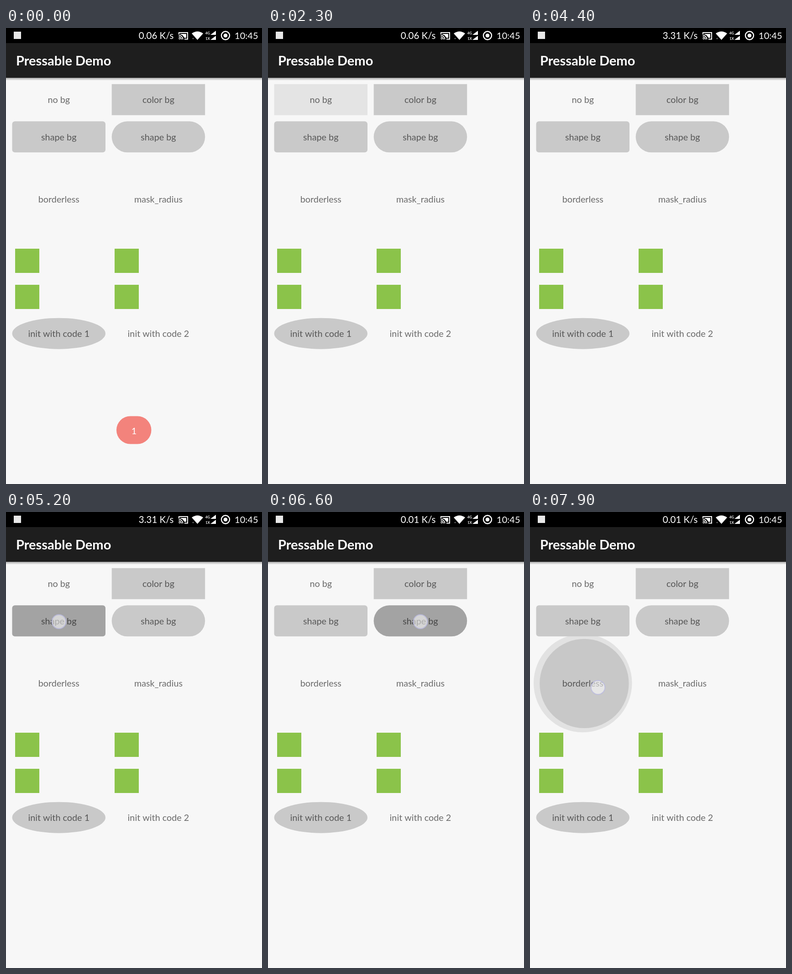
Animation, 561 px wide and 998 px high, one loop 8 s. Source, as an HTML page with a canvas:

```html
<!DOCTYPE html>
<html lang="en">
<head>
<meta charset="utf-8">
<title>Pressable Demo</title>
<style>
html, body { margin: 0; width: 100%; height: 100%; overflow: hidden; background: #f7f7f7; }
canvas { display: block; }
</style>
</head>
<body>
<canvas id="stage" width="561" height="998"></canvas>
<script>
const ctx = document.getElementById('stage').getContext('2d');
const LOOP = 8000, STEP = 100;
const W = 204.5, H = 68, RADIUS = 107.8;
const GREY = '#c9c9c9', INK = 'rgba(0,0,0,.57)';
const clamp = v => Math.max(0, Math.min(1, v));

// Touches: down and up in ms, x and y of the finger
const buttons = [
  { label: 'borderless', x: 13.5, y: 340.5, borderless: true, touch: [7500, 8600, 149, 384] },
  { label: 'mask_radius', x: 231.7, y: 340.5 },
  { label: 'no bg', x: 13.5, y: 122.7, corner: 0, touch: [1230, 2050, 116, 155.5] },
  { label: 'color bg', x: 231.7, y: 122.7, corner: 0, fill: true, touch: [2550, 3200, 334, 158] },
  { label: 'shape bg', x: 13.5, y: 204.3, corner: 6, fill: true, touch: [4450, 5350, 116, 240] },
  { label: 'shape bg', x: 231.7, y: 204.3, corner: 34, fill: true, touch: [6050, 6620, 334, 240] },
  { label: 'init with code 1', x: 13.5, y: 634.7, ellipse: true, fill: true },
  { label: 'init with code 2', x: 231.7, y: 634.7 }
];

function text(str, x, y, size, color, align = 'center', weight = 400) {
  ctx.font = `${weight} ${size}px Lato, sans-serif`;
  ctx.textAlign = align;
  ctx.fillStyle = color;
  ctx.fillText(str, x, y);
}

function rect(x, y, w, h, color) {
  ctx.fillStyle = color;
  ctx.fillRect(x, y, w, h);
}

function disc(x, y, r, color) {
  ctx.beginPath();
  ctx.arc(x, y, r, 0, 7);
  ctx.fillStyle = color;
  ctx.fill();
}

function polygon(points, color) {
  ctx.beginPath();
  points.forEach(([x, y]) => ctx.lineTo(x, y));
  ctx.fillStyle = color;
  ctx.fill();
}

function arc(x, y, r, from, to, width, color) {
  ctx.beginPath();
  ctx.arc(x, y, r, from, to);
  ctx.lineWidth = width;
  ctx.strokeStyle = color;
  ctx.stroke();
}

function outline({ x, y, corner, ellipse }) {
  ctx.beginPath();
  if (ellipse) ctx.ellipse(x + W / 2, y + H / 2, W / 2, H / 2, 0, 0, 7);
  else ctx.roundRect(x, y, W, H, corner);
}

function ripple({ x, y, touch: [down, up, tx, ty] }, t) {
  const start = down + 100, grow = t - start - 80;
  if (t < start) return;
  const cx = x + W / 2, cy = y + H / 2;
  const base = clamp((t - start) / 120) * clamp(1 - (t - up) / 440);
  disc(cx, cy, RADIUS, `rgba(0,0,0,${.085 * base})`);
  if (grow <= 0) return;
  const p = 1 - 400 ** (-1.4 * Math.min(1, grow / 780));
  const alpha = .115 * clamp(grow / 120) * clamp(1 - (t - up) / 400);
  disc(tx + (cx - tx) * p, ty + (cy - ty) * p, RADIUS * p, `rgba(0,0,0,${alpha})`);
}

function drawButton(button, t) {
  const { x, y, label, fill, touch, borderless } = button;
  if (fill) {
    outline(button);
    ctx.fillStyle = GREY;
    ctx.fill();
  }
  if (touch) {
    ctx.save();
    if (!borderless) {
      outline(button);
      ctx.clip();
    }
    ripple(button, t);
    ctx.restore();
  }
  text(label, x + W / 2, y + H / 2 + 7.5, 19.8, INK);
}

function drawFinger([down, up, x, y], t) {
  if (t < down || t >= up) return;
  disc(x, y, 16, 'rgba(255,255,255,.55)');
  arc(x, y, 15.3, 0, 7, 2, 'rgba(175,175,220,.7)');
}

function drawStatusBar(t) {
  rect(0, 0, 561, 33, '#000');
  rect(17, 8, 16, 16, '#e8e8e8');
  const speed = t < 2900 ? '0.06' : t < 6200 ? '3.31' : '0.01';
  text(speed + ' K/s', 367.5, 24, 20.5, '#fff', 'right');
  text('10:45', 552.5, 24, 20, '#fff', 'right');

  // Cast
  ctx.strokeStyle = '#fff';
  ctx.lineWidth = 2;
  ctx.beginPath();
  [[379, 14], [379, 10], [398, 10], [398, 24.5], [391, 24.5]].forEach(p => ctx.lineTo(...p));
  ctx.stroke();
  polygon([[382, 13], [395, 13], [395, 21.5], [391, 21.5], [387, 16], [382, 14]], '#fff');
  for (const r of [2, 5.5, 9]) arc(378.5, 25, r, -Math.PI / 2, 0, 2, '#fff');

  // Wi-Fi
  ctx.beginPath();
  ctx.moveTo(419.5, 26);
  ctx.lineTo(407, 12);
  ctx.quadraticCurveTo(419.5, 3, 432, 12);
  ctx.fillStyle = '#fff';
  ctx.fill();
  polygon([[408, 22], [412, 22], [410, 25]], '#777');

  // Mobile signal
  text('4G', 442, 14, 7.5, '#fff', 'center', 700);
  text('1X', 442, 25.5, 7.5, '#fff', 'center', 700);
  for (const y of [15, 26]) polygon([[448, y], [460, y], [460, y - 9]], '#fff');

  // Battery
  arc(481, 16.5, 9, 0, 7, 2.4, '#fff');
  disc(481, 16.5, 4.3, '#fff');
}

function drawHeader() {
  const shade = ctx.createLinearGradient(0, 109, 0, 115);
  shade.addColorStop(0, 'rgba(0,0,0,.32)');
  shade.addColorStop(1, 'rgba(0,0,0,0)');
  rect(0, 109, 561, 6, shade);
  rect(0, 33, 561, 76, '#1e1e1e');
  text('Pressable Demo', 22, 81.5, 29, '#fff', 'left', 700);
}

function drawToast(t) {
  ctx.globalAlpha = clamp(1 - t / 500);
  ctx.beginPath();
  ctx.roundRect(242, 849.5, 76.5, 61, 30.5);
  ctx.fillStyle = '#f3837c';
  ctx.fill();
  text('1', 280.5, 888.5, 20, '#fff');
  ctx.globalAlpha = 1;
}

function draw(now) {
  const t = Math.floor(now % LOOP / STEP) * STEP;
  rect(0, 0, 561, 998, '#f7f7f7');
  drawHeader();
  drawStatusBar(t);
  buttons.forEach(b => drawButton(b, t));
  for (const x of [20, 238]) for (const y of [483, 562]) rect(x, y, 53, 53, '#8bc34a');
  drawToast(t);
  buttons.forEach(b => b.touch && drawFinger(b.touch, t));
}

const begin = performance.now();
(function frame() {
  draw(performance.now() - begin);
  requestAnimationFrame(frame);
})();
</script>
</body>
</html>
```
